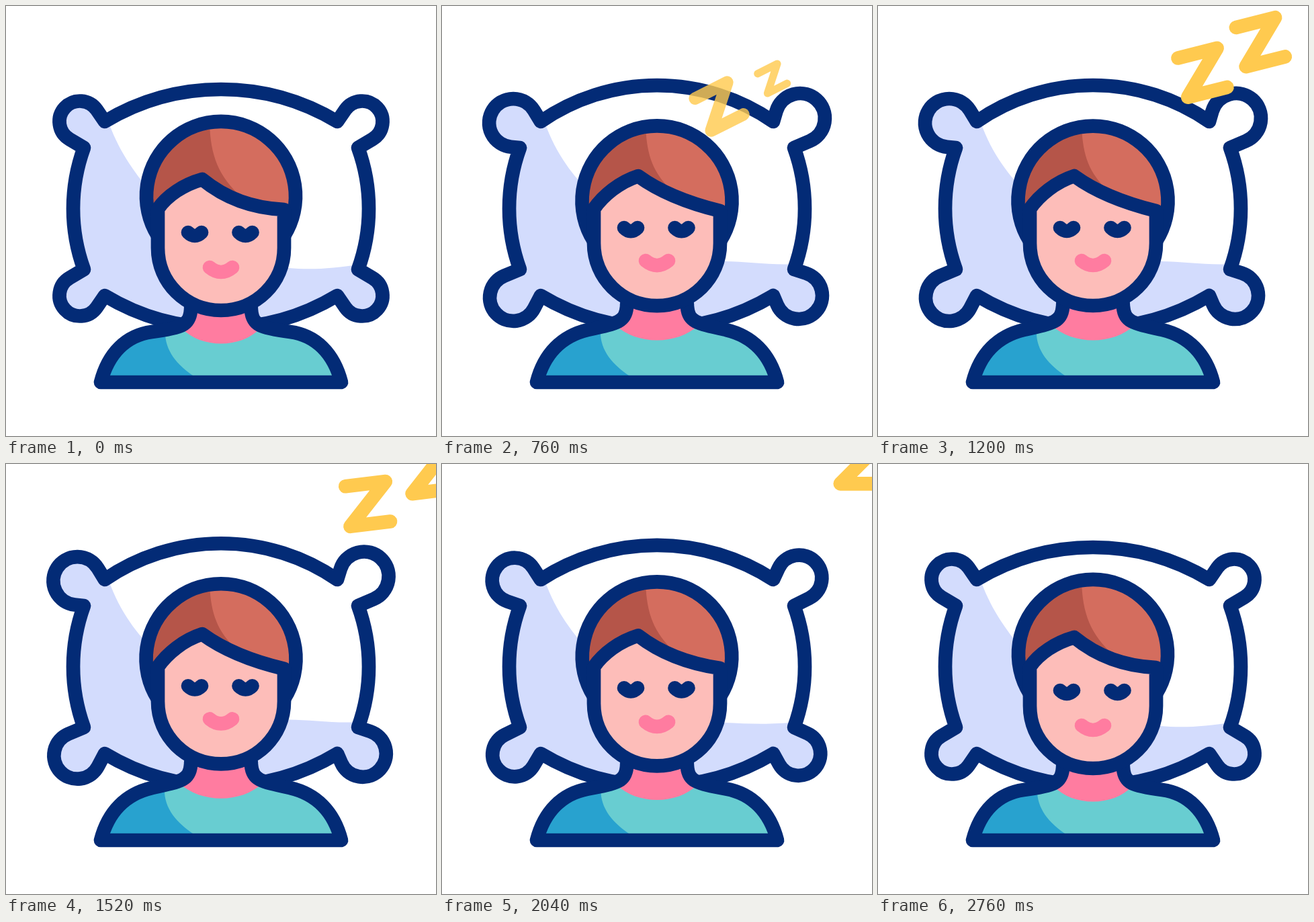
Animation, 640 px wide and 640 px high, one loop 3 s. Source, as an HTML page with a canvas:

```html
<!DOCTYPE html>
<html lang="en">
<head>
<meta charset="utf-8">
<title>Sleeping</title>
<style>
html, body { margin: 0; height: 100%; overflow: hidden; background: #fff; }
canvas { display: block; width: 100vw; height: 100vh; }
</style>
</head>
<body>
<canvas width="640" height="640"></canvas>
<script>
const ctx = document.querySelector('canvas').getContext('2d');
const LOOP = 3000, MID_X = 320, MID_Y = 301.5, STROKE = 20.7;
const NAVY = '#032b76', LILAC = '#d3dcfd', ROSE = '#ff7ca0';

const clamp = v => Math.max(0, Math.min(1, v));
const ramp = (t, start, span) => clamp((t - start) / span);
const smooth = v => v * v * (3 - 2 * v);

function fill(path, color) {
  ctx.fillStyle = color;
  ctx.fill(new Path2D(path));
}

function line(path, color = NAVY) {
  ctx.strokeStyle = color;
  ctx.stroke(new Path2D(path));
}

// Filled shape with colour patches clipped inside it, then its outline
function shape(path, color, patches = []) {
  fill(path, color);
  ctx.save();
  ctx.clip(new Path2D(path));
  for (const [patch, tint] of patches) fill(patch, tint);
  ctx.restore();
  line(path);
}

// Radius of a circular arc from half its chord and its height
const arcRadius = (half, rise) => (half * half + rise * rise) / (2 * rise);

// Clockwise lobe around a circle, joined to both end points by tangents
function lobe(from, to, [cx, cy], r) {
  const touch = ([x, y], side) => {
    const dx = x - cx, dy = y - cy;
    const a = Math.atan2(dy, dx) + side * Math.acos(clamp(r / Math.hypot(dx, dy)));
    return [cx + r * Math.cos(a), cy + r * Math.sin(a)];
  };
  return `${from}L${touch(from, 1)}A${r} ${r} 0 1 1 ${touch(to, -1)}L${to}`;
}

function pillow(b) {
  // Side of each corner, then how its lobe shifts and grows with a breath
  const corners = [[-1, -1, -4, 2, 5.5], [1, -1, 3, -5, 6.5], [1, 1, 1, 0, 4.5], [-1, 1, -4, 3, 4.5]];
  const side = arcRadius(90.5, 16);
  const radii = [side, arcRadius(173, 48 + 6 * b), side, arcRadius(173, 48)];
  const at = (sx, sy, x, y) => [MID_X + sx * x, MID_Y + sy * y];
  const arc = r => `A${r} ${r} 0 0 1 `;
  let path = '', start;
  corners.forEach(([sx, sy, dx, dy, grow], i) => {
    const ends = [at(sx, sy, 204, 90.5), at(sx, sy, 173, 129.5)];
    if (sx !== sy) ends.reverse();
    const [x, y] = at(sx, sy, 210, 129.5);
    start ??= ends[0];
    path += (i ? arc(radii[i]) : 'M') + lobe(...ends, [x + dx * b, y + dy * b], 30.5 + grow * b);
  });
  return path + arc(side) + start + 'Z';
}

// Cubic outline from its left half, mirrored about the middle
function mirrored(points) {
  const [first, ...rest] = [...points, ...points.map(([x, y]) => [2 * MID_X - x, y]).reverse()];
  return `M${first}C${rest.join(' ')}Z`;
}

function bedding(b) {
  const shade = `M0 100H150V165C166 214 190 246 217 ${279 - 4 * b}
    L420 ${390 - 10 * b}C455 ${393 - 13 * b} 485 ${391 - 5 * b} 530 384H640V640H0Z`;
  shape(pillow(b), '#fff', [[shade, LILAC]]);
}

function body(b) {
  const outline = mirrored([
    [141, 560], [152, 517], [179, 490 + b], [217, 485 - 3 * b],
    [262, 479 - 7 * b], [273, 475 - 5 * b], [275, 453 - 5 * b], [275, 400]
  ]);
  const dip = 480 - 5 * b;
  shape(outline, '#68cdd1', [
    [`M${237 - b} 470V490C${239 - b} 517 258 538 286 555H100V470Z`, '#28a2cf'],
    [`M${262 - 4 * b} ${dip}C290 ${dip + 30} 350 ${dip + 30} ${378 + 4 * b} ${dip}V400H262Z`, ROSE]
  ]);
}

function head(b) {
  const nape = 342 + 8 * b, r = 111 + b / 2;
  shape(`M226 ${nape}A${r} ${r} 0 1 1 414 ${nape}Z`, '#d46d5e', [
    [`M303 160C302 220 ${315 - 2 * b} ${252 - 6 * b} ${350 - 9 * b} ${284 - 10 * b}L200 340V160Z`, '#b55549']
  ]);

  const jaw = 360 - 7 * b, chin = 453 - 7 * b;
  shape(`M226 302C240 282 264 ${266 - 4 * b} 292 ${258 - 5 * b}
    C325 ${285 - 8 * b} 365 ${301 - 8 * b} 414 ${303 + 2 * b}V${jaw}
    C414 ${jaw + 52} 372 ${chin} 320 ${chin}S226 ${jaw + 52} 226 ${jaw}Z`, '#fdbdb9');

  const eye = 337 - 7 * b, mouth = 389 - 10 * b;
  for (const x of [281, 356.5]) line(`M${x - 10} ${eye}q10 10 20 0`);
  line(`M303 ${mouth}q17 14 34 0`, ROSE);
}

function letter(x, y, turn, size, alpha) {
  ctx.save();
  ctx.globalAlpha = alpha;
  ctx.translate(x, y);
  ctx.rotate(turn * Math.PI / 180);
  ctx.scale(size, size);
  line('M-30 -30H30L-30 30H30', '#ffca4f');
  ctx.restore();
}

function snore(t) {
  const alpha = ramp(t, 260, 620);
  if (!alpha) return;
  const drift = Math.sin((t - 1400) * 0.00095);
  const turn = -36 * clamp((2040 - t) / 1560) ** 1.5;
  letter(517.5 + 184 * drift, 74.5 - 131.5 * drift, turn, ramp(t, 310, 505), alpha);
  letter(607.5 + 203 * drift, 27 - 142 * drift, turn, ramp(t, 345, 765), alpha);
}

function draw() {
  const t = performance.now() % LOOP;
  const breath = smooth(ramp(t, 160, 640)) - smooth(ramp(t, 1340, 1420));
  ctx.clearRect(0, 0, 640, 640);
  ctx.lineWidth = STROKE;
  ctx.lineCap = ctx.lineJoin = 'round';
  bedding(breath);
  body(breath);
  head(breath);
  snore(t);
  requestAnimationFrame(draw);
}
draw();
</script>
</body>
</html>
```
